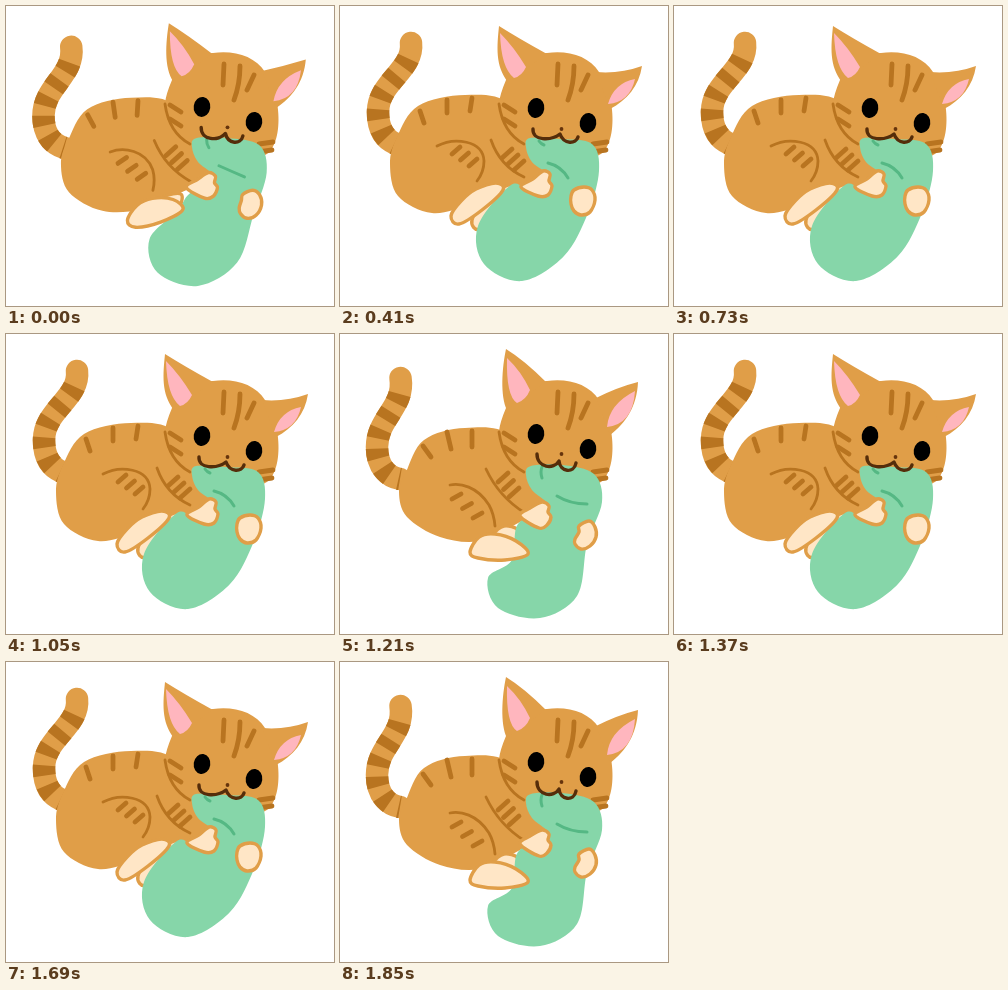
Recreate the animation shown at these times as an HTML page. Size 328 px wide and 300 px high, loop 1.93 s.

```html
<!DOCTYPE html>
<html lang="en">
<head>
<meta charset="utf-8">
<title>Kitten with a toy</title>
<style>
  html, body { margin: 0; width: 100%; height: 100%; overflow: hidden; background: #fff; }
  svg { display: block; width: 328px; height: 300px; }
  path { stroke-linecap: round; stroke-linejoin: round; }
  .fur { fill: #e09e48; }
  .tail, .bands { fill: none; stroke: #e09e48; stroke-width: 22.5; }
  .bands { stroke: #b87420; stroke-linecap: butt; }
  .marks, .line { fill: none; stroke: #b87420; stroke-width: 4.8; }
  .line { stroke-width: 2.8; }
  .toy { fill: #86d6a9; }
  .fold { fill: none; stroke: #55b884; stroke-width: 3; }
  .paw { fill: #ffe6c6; stroke: #e09e48; stroke-width: 3.4; }
  .inner-ear { fill: #ffb6be; }
  .mouth { fill: none; stroke: #552d0a; stroke-width: 3.4; }
  .nose { fill: #66340c; }
</style>
</head>
<body>
<svg id="stage" viewBox="0 0 328 300"></svg>
<script>
const stage = document.getElementById('stage');
const LOOP = 1930, REST = 410, KICK = 160;
const PULLED = 0, RESTING = 0.55, KICKED = 1;

// Blend two texts of the same structure, number by number.
function mix(from, to, amount) {
  const targets = to.match(/-?[\d.]+/g).map(Number);
  let i = 0;
  return from.replace(/-?[\d.]+/g, n => +n + (targets[i++] - n) * amount);
}

// Closed Catmull-Rom curve through "x,y x,y ..." points.
function blob(text) {
  const points = text.split(' ').map(pair => pair.split(',').map(Number));
  const at = i => points[(i + points.length) % points.length];
  const control = (i, side) => at(i).map((v, k) => v + side * (at(i + 1)[k] - at(i - 1)[k]) / 6);
  return 'M' + at(0) + points.map((_, i) =>
    `C${control(i, 1)} ${control(i + 1, -1)} ${at(i + 1)}`).join('') + 'Z';
}

// Evenly spaced parallel strokes.
const row = (x, y, dx, dy, stepX, stepY, count) => Array.from({ length: count }, (_, i) =>
  `M${x + i * stepX} ${y + i * stepY} l${dx} ${dy}`).join('');

function drawCat(kick) {
  const path = (name, pulled, kicked = pulled) => `<path class="${name}" d="${mix(pulled, kicked, kick)}"/>`;
  const shape = (name, pulled, kicked) => `<path class="${name}" d="${blob(mix(pulled, kicked, kick))}"/>`;
  const eye = (x, y) => `<ellipse cx="${x}" cy="${y}" rx="8.3" ry="10" transform="rotate(8 ${x} ${y})"/>`;
  const tail = name => path(name,
    'M71 37C74 64 38 76 38 106C38 122 44 133 56 138',
    'M60.5 44C65 73 37 84 37 113C37 133 48 143 60 145');

  return `<g>
    ${tail('tail')}
    <g stroke-dasharray="0 16${' 10 10'.repeat(5)} 10 99">${tail('bands')}</g>
    ${shape('fur',
      '57,131 78,100 125,89 172,100 211,168 175,182 132,198 92,207 58,190 50,158',
      '66,138 84,106 125,94 172,103 211,170 180,188 140,207 100,203 67,183 59,158')}
    ${shape('paw', '132,214 148,190 172,179 162,200 140,223', '154,200 164,192 178,196 178,210 158,210')}

    ${path('fur', 'M166 74C170 60 185 47 207 47C228 44 249 50 259 66C277 90 278 143 257 150L190 140C170 132 156 113 159 97Q160 88 166 74Z')}
    ${path('fur',
      'M168 76C155 60 157 40 159 20Q178 32 207 48Z M256 66Q280 68 302 60C299 80 287 94 270 103Z',
      'M167 76C160 62 162 34 166 15Q184 26 206 48Z M256 64Q278 53 298 48C297 72 286 89 270 101Z')}
    ${path('inner-ear',
      'M160 27Q161 62 174 72Q182 70 186 61Q174 41 160 27Z M295 73Q274 77 268 98Q290 96 295 73Z',
      'M167 24Q166 62 177 69Q186 66 190 56Q181 37 167 24Z M295 57Q269 70 267 93Q293 90 295 57Z')}

    ${path('marks', 'M218 58L217 79M234 60Q234 78 228 94M248 69L241 84')}
    ${path('marks', row(164, 99, 11, 7, 0, 14, 2) + row(253, 138, 14, -2, -1, 8, 2))}
    ${path('marks',
      'M80 105L84 117M107 94L107 107M132 92L130 105',
      'M83 112L91 123M107 98L111 115M132 97L132 113')}
    ${path('marks', row(112, 148, 8, -7, 8.5, 6, 3), row(112, 165, 9, -5, 10.5, 9.5, 3))}
    ${path('marks', row(162, 152, 10, -9, 6, 6, 3), row(158, 148, 10, -9, 5.5, 7.5, 3))}
    ${path('line', 'M159 98Q163 127 184 138')}
    ${path('line', 'M97 140C114 131 143 134 144 155Q144 166 137 175', 'M110 151C120 149 137 152 149 171Q154 180 155 192')}
    ${path('line', 'M151 134Q160 160 184 171', 'M146 135Q159 163 185 179')}

    ${shape('toy',
      '186,141 190,132 220,133 252,138 259,165 248,207 224,250 182,275 144,258 138,220 171,179 190,185 210,172 192,156',
      '186,141 191,132 222,131 254,140 262,168 247,210 237,262 200,284 158,274 148,244 172,226 178,190 209,174 192,156')}
    ${path('fold',
      'M199 135Q201 138 204 139M208 157Q221 160 228 172',
      'M202 133Q200 138 202 144M217 162Q230 170 247 170')}

    ${shape('paw',
      '111,210 121,195 136,183 156,177 163,184 142,204 119,218',
      '130,218 139,203 155,200 176,207 188,220 165,226 138,224')}
    ${shape('paw',
      '181,181 193,173 203,165 210,168 209,175 212,180 208,189 198,190',
      '180,182 190,174 202,168 209,172 208,178 211,183 207,191 199,194')}
    ${shape('paw',
      '231,190 234,184 244,181 252,184 255,194 250,206 241,209 234,205 231,198',
      '239,198 239,192 249,187 255,193 256,203 250,212 241,215 235,210 235,205')}

    ${eye(196, 102 - 2 * kick)}${eye(248, 117 - 2 * kick)}
    <circle class="nose" cx="221.5" cy="${123 - 3 * kick}" r="1.9"/>
    ${path('mouth',
      'M193 123C192 135 211 135 220 128C224 139 236 138 238 131',
      'M197 120C197 134 214 136 219 127C220 138 234 140 236 129')}
  </g>`;
}

function kickAt(time) {
  if (time < REST) return RESTING;
  return Math.floor((time - REST) / KICK) % 2 ? KICKED : PULLED;
}

const start = performance.now();
let shown;
function frame() {
  const kick = kickAt((performance.now() - start) % LOOP);
  if (kick !== shown) stage.innerHTML = drawCat(shown = kick);
  requestAnimationFrame(frame);
}
frame();
</script>
</body>
</html>
```
